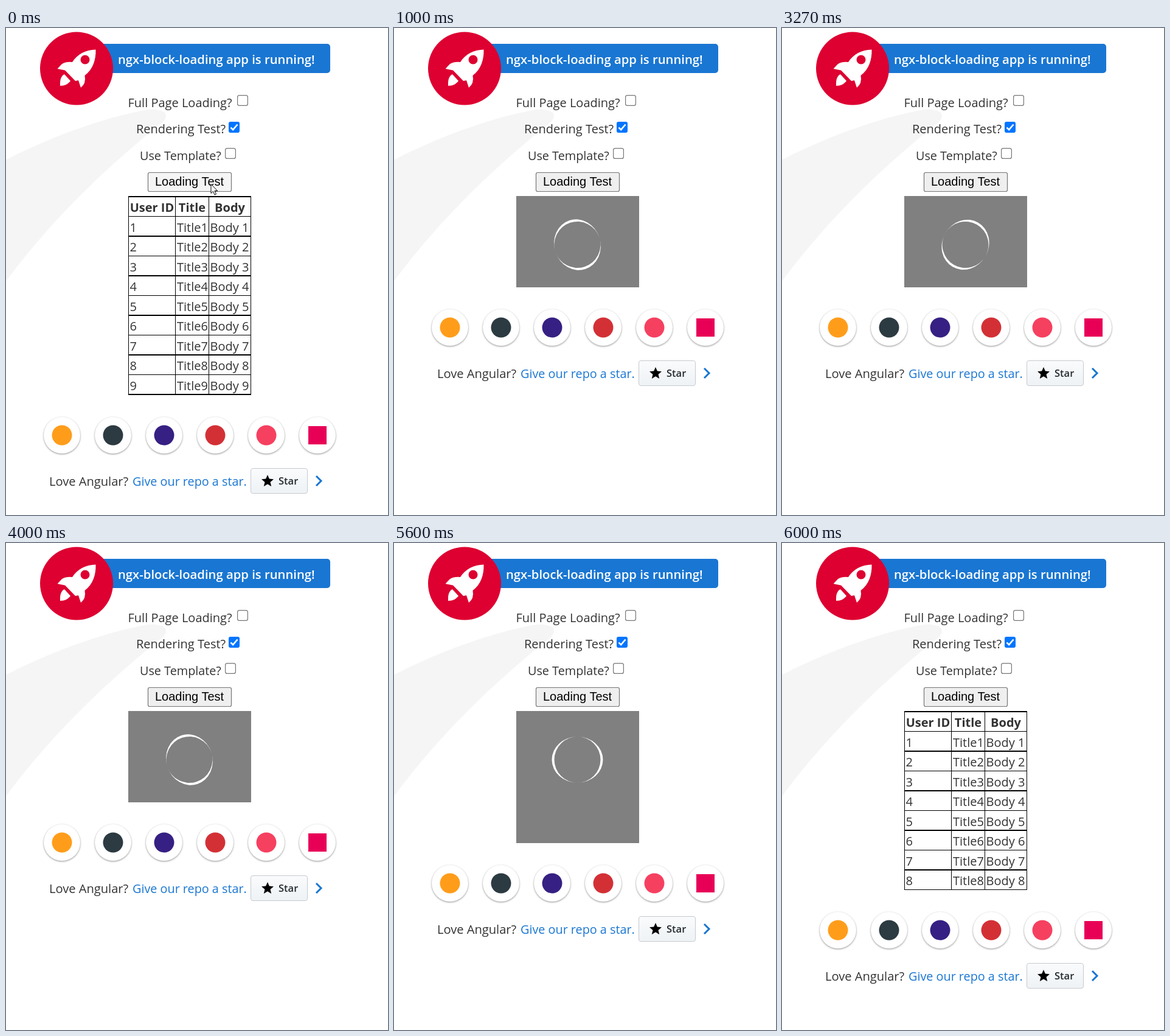
An HTML page for the animation above (7340 ms loop, 628 by 800 pixels).

```html
<!DOCTYPE html>
<html lang="en">
<head>
<meta charset="utf-8">
<title>Block loading demo</title>
<style>
  html, body { margin: 0; width: 100%; height: 100%; overflow: hidden; background: #fff; }
  svg { display: block; font: 20px "Open Sans", "Noto Sans", sans-serif; fill: #333; }
  .semibold { font-weight: 600; }
  .link { fill: #1976d2; font-size: 19.8px; }
  .header { font-weight: 700; text-anchor: middle; }
  .box { fill: #fff; stroke: #767676; stroke-width: 1.2; }
  .badge { fill: #fff; filter: drop-shadow(0 1px 1.5px rgba(0,0,0,.3)) drop-shadow(0 1px 1px rgba(0,0,0,.14)); }
</style>
</head>
<body>
<svg width="628" height="800" viewBox="0 0 628 800">
  <defs>
    <linearGradient id="buttonFill" x2="0" y2="1">
      <stop stop-color="#fafbfc"/><stop offset=".9" stop-color="#eff3f6"/>
    </linearGradient>
  </defs>

  <!-- Smoke trail, mostly outside the left edge -->
  <path fill="#f5f5f5" transform="translate(-563 134) scale(1.6)"
    d="M498 0C498 0 -4 75 0 729L242 621C215 476 230 237 514 12C524 -2 498 0 498 0Z"/>

  <rect x="116" y="26" width="417" height="48" rx="5" fill="#1976d2"/>
  <text class="semibold" x="184" y="59" font-size="20.25" style="fill:#fff">ngx-block-loading app is running!</text>
  <circle cx="116" cy="66.5" r="60" fill="#dd0031"/>
  <g fill="#fff">
    <path d="M147.5 35.5C131 36 117 43 109 56Q97 55 91 60L84.5 67L97 69.5L114 87L119 86L123 98Q132 91 129.5 78C143 68 148 52 147.5 35.5Z"/>
    <path d="M96 76C90 79 88.5 86 89 95C97 95 102 92 106 87Z"/>
  </g>
  <circle cx="130" cy="52" r="7.5" fill="#dd0031"/>

  <text x="200.5" y="130">Full Page Loading?</text>
  <text x="214" y="173">Rendering Test?</text>
  <text x="220" y="217" font-size="19.8">Use Template?</text>
  <rect class="box" x="380.6" y="110.6" width="16.8" height="16.8" rx="3"/>
  <rect x="366" y="154" width="18" height="18" rx="3" fill="#0075ff"/>
  <path d="M369.5 163.5L373.2 167.2L380.5 158.5" fill="none" stroke="#fff" stroke-width="2.6"/>
  <rect class="box" x="360.6" y="197.6" width="16.8" height="16.8" rx="3"/>

  <rect id="loadButton" x="233.5" y="237.5" width="137" height="31" rx="2.5" stroke="#767676" stroke-width="1.2"/>
  <text x="245" y="259" fill="#000" style="font-family:'Liberation Sans',Arial,sans-serif">Loading Test</text>

  <g id="table"></g>

  <g id="loader">
    <rect id="overlay" x="201" y="276" width="202" fill="#808080"/>
    <path id="spinner" fill="#fff" fill-rule="evenodd"
      d="M-42 0A42 38 0 0 1 42 0A42 38 0 0 1 -42 0ZM-38 0A38 38 0 0 1 38 0A38 38 0 0 1 -38 0Z"/>
  </g>

  <!-- y = 0 is the centre line of the badges -->
  <g id="footer">
    <g id="badges"></g>
    <text x="71" y="83" font-size="20.1">Love Angular?</text>
    <text class="link" x="208" y="83">Give our repo a star.</text>
    <rect x="402.5" y="54.5" width="93" height="41" rx="3.5" fill="url(#buttonFill)" stroke="#c6cacf"/>
    <path transform="translate(418 63)" fill="#000"
      d="M12 17.3L18.2 21L16.5 14L22 9.2L14.8 8.6L12 2L9.2 8.6L2 9.2L7.5 14L5.8 21Z"/>
    <text class="semibold" x="448" y="81" font-size="16.5" fill="#24292e">Star</text>
    <path d="M510 67L518 75L510 83" fill="none" stroke="#1976d2" stroke-width="3"/>
  </g>

  <path id="cursor" fill="#fff" stroke="#000" d="M0 0V15L3.5 11.8L6 17.5L8.5 16.4L6 11H10.7Z"/>
</svg>
<script>
const LOOP = 7340, LOAD_START = 130, LOAD_END = 6000;
const TOP = 276, ROW = 32.5, COLUMNS = [201, 278, 333, 402];
const el = id => document.getElementById(id);
const move = (node, x, y, extra = '') => node.setAttribute('transform', `translate(${x} ${y}) ${extra}`);
const show = (node, visible) => node.setAttribute('display', visible ? 'inline' : 'none');

// Borders alternate between two pixels and one.
const lineY = i => Math.round(TOP + ROW * i);
const lineWidth = i => i % 2 ? 1 : 2;
const tableHeight = rows => lineY(rows + 1) + lineWidth(rows + 1) - TOP;

function tableMarkup(rows) {
  const bar = (x, y, w, h) => `<rect x="${x}" y="${y}" width="${w}" height="${h}" fill="#000"/>`;
  const cell = (x, row, text, type = '') =>
    `<text class="${type}" x="${x}" y="${302 + ROW * row}">${text}</text>`;
  const height = tableHeight(rows);
  let markup = `<rect x="201" y="${TOP}" width="202" height="${height}" fill="#fff"/>`;
  markup += cell(240, 0, 'User ID', 'header') + cell(306, 0, 'Title', 'header') + cell(368, 0, 'Body', 'header');
  for (let i = 1; i <= rows; i++)
    markup += cell(203.5, i, i) + cell(281, i, 'Title' + i) + cell(335.5, i, 'Body ' + i);
  for (let i = 0; i <= rows + 1; i++) markup += bar(201, lineY(i), 202, lineWidth(i));
  return markup + COLUMNS.map(x => bar(x, TOP, 1, height)).join('');
}

el('badges').innerHTML = ['#ff9d1b', '#2c3a41', '#362083', '#d33036', '#f64060', '#e80057'].map((color, i) => {
  const x = 92 + 84 * i;
  const mark = i < 5
    ? `<circle cx="${x}" r="16.5" fill="${color}"/>`
    : `<rect x="${x - 15}" y="-15" width="30" height="30" fill="${color}"/>`;
  return `<circle class="badge" cx="${x}" r="30"/>${mark}`;
}).join('');

// The picture advances fifteen times a second, on whole hundredths.
const stepTime = step => Math.round(step * 20 / 3) * 10;
function stepAt(t) {
  const step = Math.floor(t * 0.015 + 0.06);
  return stepTime(step) > t ? step - 1 : step;
}

let shownRows = 0;
function draw(now) {
  const step = stepAt(now % LOOP), t = stepTime(step);
  const loading = t >= LOAD_START && t < LOAD_END;
  const rows = t < LOAD_START ? 9 : 8;
  if (rows !== shownRows) {
    el('table').innerHTML = tableMarkup(rows);
    shownRows = rows;
  }
  show(el('table'), !loading);
  show(el('loader'), loading);

  // Hidden lines arrive one by one and finally outgrow the minimum height.
  const lines = Math.floor((t - 2930) / 330);
  const height = loading ? Math.max(150, 1 + 27 * lines) : tableHeight(rows);
  el('overlay').setAttribute('height', height);
  move(el('spinner'), 301.5, 356, `rotate(${12 * step - 108})`);
  move(el('footer'), 0, TOP + height + 66);

  el('loadButton').setAttribute('fill', t < LOAD_START ? '#f5f5f5' : '#efefef');
  const slide = Math.max(0, (t - 200) / 470);
  move(el('cursor'), 337 + 220 * slide * slide, 256.5 + 40 * slide);
  show(el('cursor'), slide <= 1);
}

function tick() {
  draw(performance.now());
  requestAnimationFrame(tick);
}
tick();
</script>
</body>
</html>
```
